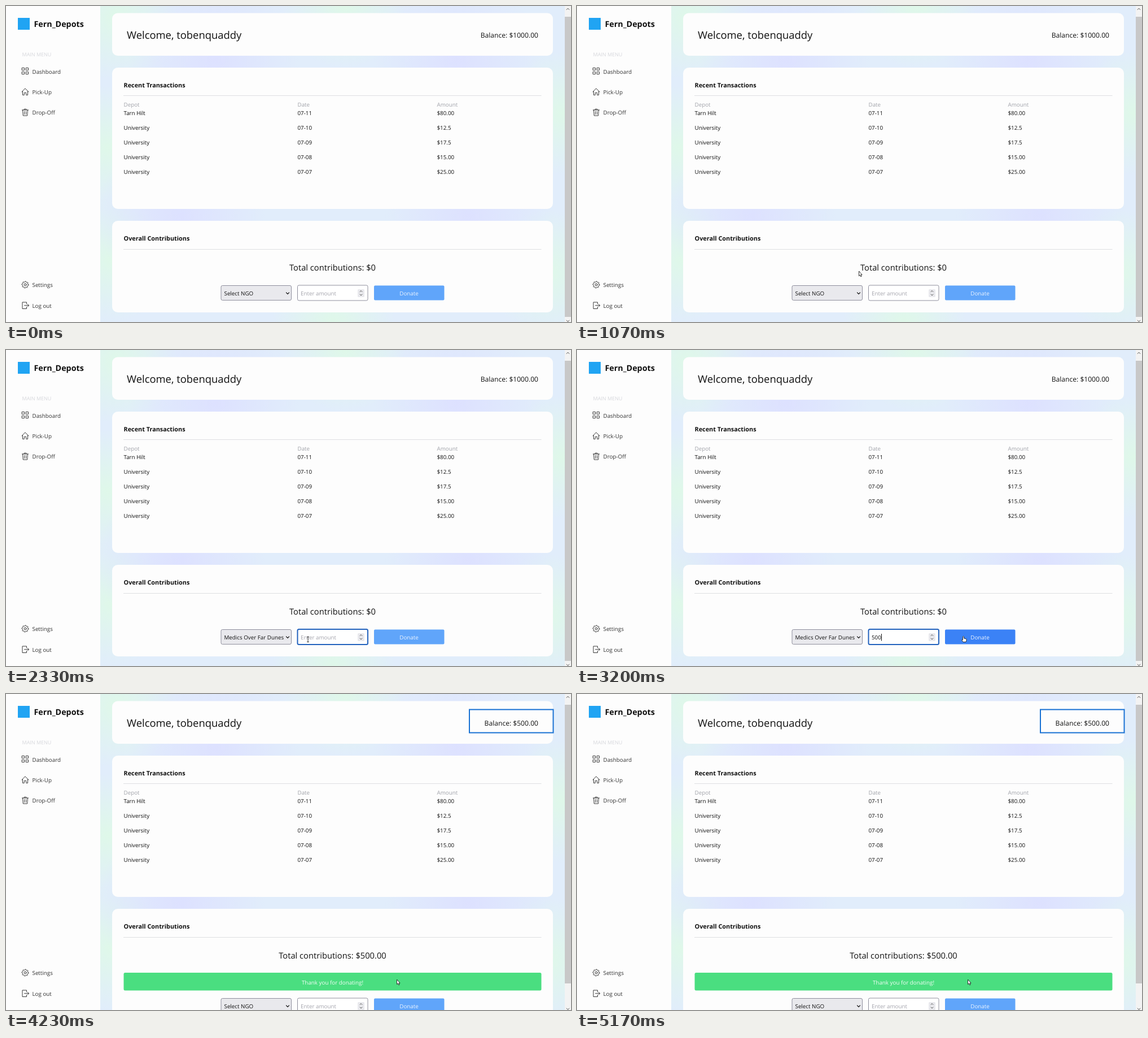
Recreate the animation shown at these times as an HTML page. Size 1001x559 px, loop 5.21 s.

```html
<!DOCTYPE html>
<html lang="en">
<head>
<meta charset="utf-8">
<title>Donation dashboard</title>
<style>
html, body { margin: 0; width: 100%; height: 100%; overflow: hidden; background: #fdfdfd; }
svg { display: block; width: 1001px; height: 559px; }
text { font: 9.8px "Open Sans", "Noto Sans", sans-serif; fill: #111; white-space: pre; text-rendering: geometricPrecision; }
.bold { font-weight: 700; font-size: 10.85px; }
.brand { font-weight: 700; font-size: 14.3px; }
.menu { fill: #333; }
.muted { fill: #a1a3aa; }
.mid { text-anchor: middle; }
.icon { fill: none; stroke: #3a3a3a; stroke-linecap: round; stroke-linejoin: round; }
.card { fill: #fdfdfd; }
.rule { stroke: #dedfe2; }
.field { stroke: #8f8f9d; }
</style>
</head>
<body>
<svg viewBox="0 0 1001 559">
  <defs>
    <radialGradient id="mint"><stop stop-color="#dff8e9"/><stop offset="1" stop-color="#dff8e9" stop-opacity="0"/></radialGradient>
    <radialGradient id="lilac"><stop stop-color="#dde1ff"/><stop offset="1" stop-color="#dde1ff" stop-opacity="0"/></radialGradient>
    <clipPath id="main"><path d="M167 0H990V559H167z"/></clipPath>
  </defs>

  <g clip-path="url(#main)">
    <path fill="#e1edfb" d="M167 0H990V559H167z"/>
    <g id="glow"></g>
    <rect class="card" x="188" y="12.5" width="781" height="75.5" rx="10"/>
    <rect class="card" x="188" y="109" width="781" height="250" rx="10"/>
    <rect class="card" id="giving" x="188" y="380" width="781" height="162" rx="10"/>
  </g>
  <path class="rule" d="M208 158.5H948.5M208 430.5H948.5"/>

  <rect x="21" y="21" width="21" height="21" fill="#20a4f3"/>
  <text class="brand" x="49.5" y="37">Fern_Depots</text>
  <text x="28.5" y="88.5" style="font-size:9px;fill:#d6d7dc">MAIN MENU</text>
  <g id="menu"></g>
  <g class="icon">
    <path d="M28.5 109.5h4v4h-4zM35.5 109.5h4v4h-4zM28.5 116.5h4v4h-4zM35.5 116.5h4v4h-4z"/>
    <path d="M27.8 152L34 145.8 40.2 152M29.5 150.5V157.5H32.3V153.5H35.7V157.5H38.5V150.5"/>
    <path d="M28.5 184H39.5M32 184V182.3H36V184M29.5 184L30.3 194H37.7L38.5 184M32.5 186.5V191.5M35.5 186.5V191.5"/>
    <path id="gear"/>
    <circle cx="34" cy="493" r="2"/>
    <path d="M36.5 527V524H29V535.5H36.5V532.5M32.5 529.7H40.5M38.3 527.5L40.5 529.7 38.3 532"/>
  </g>

  <text x="214" y="58" style="font-size:18.4px">Welcome, tobenquaddy</text>
  <text id="balance" x="943" y="56" text-anchor="end" style="font-size:12.1px"></text>
  <rect id="highlight" x="821" y="27.5" width="148.5" height="41" fill="none" stroke="#1871d3" stroke-width="2"/>

  <text class="bold" x="208.5" y="144">Recent Transactions</text>
  <g id="table"></g>

  <text class="bold" x="208.5" y="415">Overall Contributions</text>
  <text class="mid" id="total" x="578.5" y="468" style="font-size:14.7px"></text>
  <g id="thanks">
    <rect x="208.5" y="493" width="740" height="31.5" rx="2.5" fill="#4ade80"/>
    <text class="mid" x="578.5" y="513.5" style="fill:#f0fdf4">Thank you for donating!</text>
  </g>

  <g id="form">
    <rect class="field" x="381" y="494.5" width="124.5" height="26" rx="2.5" fill="#e9e9ed"/>
    <text id="charity" x="386.5" y="512"></text>
    <path class="icon" d="M496.5 507L499 509.5 501.5 507" style="stroke:#222;stroke-width:1.2"/>
    <rect id="amountBox" class="field" x="516.5" y="494" width="124.5" height="27" rx="2.5" fill="#fff"/>
    <text id="amount" x="522" y="512"></text>
    <path id="caret" d="M539.5 502V514.5" stroke="#111"/>
    <rect x="623" y="501" width="12" height="14" rx="1.5" fill="#e9e9ed"/>
    <path class="icon" d="M627 505.5L629 503.5 631 505.5M627 510L629 512 631 510" style="stroke:#555"/>
    <rect id="button" x="652" y="494.5" width="124.5" height="26" rx="2"/>
    <text class="mid" x="714" y="512" style="fill:#eaf3ff">Donate</text>
  </g>

  <path fill="#f3f3f3" d="M990 0H1001V559H990z"/>
  <rect id="thumb" x="990" y="19" width="11" fill="#c8c8c8"/>
  <path class="icon" d="M993.2 6.5L995.5 4 997.8 6.5M993.2 556L995.5 558.5 997.8 556" style="stroke:#555"/>

  <g id="pointer" stroke="#222" stroke-width=".9" stroke-linejoin="round" fill="#fff">
    <path id="arrow" d="M0 0V8.6L1.9 6.9 3.2 9.8 4.6 9.2 3.4 6.4H5.6z"/>
    <path id="beam" fill="none" d="M-1.8 .5H1.8M0 .5V9.5M-1.8 9.5H1.8"/>
    <path id="hand" d="M-1 6V1Q0 -.4 1 1V4L5 5Q5.8 5.4 5.5 7.5L4.5 10.5H-.5L-3 7Q-2.6 5.4 -1 7z"/>
  </g>
</svg>
<script>
const LOOP = 5210;
const PICKED = 1500, FOCUSED = 2200, DONATED = 3500, MARKED = 3650;
const TYPED = [2500, 2620, 2740];
// Pointer stops: time, x, y
const STOPS = [
  [800, 560, 562], [1060, 499.5, 469], [1120, 499.5, 469], [1280, 452, 506],
  [1540, 452, 506], [1780, 535, 507], [2780, 535, 507], [3080, 684.5, 506],
  [3560, 684.5, 506], [3800, 692.5, 505]
];

const $ = id => document.getElementById(id);
const show = (id, on) => $(id).setAttribute('visibility', on ? 'visible' : 'hidden');
const label = (x, y, text, kind = '') => `<text class="${kind}" x="${x}" y="${y}">${text}</text>`;
const glow = (kind, x, y, r) => `<circle cx="${x}" cy="${y}" r="${r}" fill="url(#${kind})"/>`;

$('glow').innerHTML =
  [[195, 20], [180, 250], [185, 450], [600, 0], [985, 190], [960, 470], [580, 560]].map(([x, y]) => glow('mint', x, y, 110)).join('') +
  [[370, 95], [800, 95], [310, 370], [820, 370]].map(([x, y]) => glow('lilac', x, y, 150)).join('');

$('menu').innerHTML = [['Dashboard', 119.5], ['Pick-Up', 156], ['Drop-Off', 192], ['Settings', 497], ['Log out', 534]]
  .map(([name, y]) => label(46.5, y, name, 'menu')).join('');

const columns = [208.5, 516.5, 763.5];
const row = (cells, y, kind) => cells.map((cell, i) => label(columns[i], y, cell, kind)).join('');
$('table').innerHTML = row(['Depot', 'Date', 'Amount'], 177.5, 'muted') +
  ['80.00', '12.5', '17.5', '15.00', '25.00'].map((sum, i) =>
    row([i ? 'University' : 'Tarn Hilt', '07-' + String(11 - i).padStart(2, '0'), '$' + sum], 193 + 26.1 * i)).join('');

$('gear').setAttribute('d', 'M' + Array.from({ length: 32 }, (_, i) => {
  const a = i * Math.PI / 16, r = i % 4 < 2 ? 6 : 4.7;
  return `${(34 + r * Math.cos(a)).toFixed(2)} ${(493 + r * Math.sin(a)).toFixed(2)}`;
}).join('L') + 'z');

function pointerAt(t) {
  const next = STOPS.findIndex(stop => stop[0] > t);
  if (next < 1) return STOPS[next ? STOPS.length - 1 : 0].slice(1);
  const [t0, x0, y0] = STOPS[next - 1], [t1, x1, y1] = STOPS[next];
  const p = (t - t0) / (t1 - t0), ease = p * p * (3 - 2 * p);
  return [x0 + (x1 - x0) * ease, y0 + (y1 - y0) * ease];
}

function render(t) {
  const done = t >= DONATED, focused = t >= FOCUSED && !done;
  const typed = done ? '' : '500'.slice(0, TYPED.filter(time => t >= time).length);
  const [x, y] = pointerAt(t);
  const inForm = !done && y > 494 && y < 521;
  const overInput = inForm && x > 516 && x < 641;
  const overButton = inForm && x > 652 && x < 777;

  $('balance').textContent = done ? 'Balance: $500.00' : 'Balance: $1000.00';
  $('total').textContent = 'Total contributions: ' + (done ? '$500.00' : '$0');
  $('charity').textContent = t >= PICKED && !done ? 'Medics Over Far Dunes' : 'Select NGO';
  $('amount').textContent = typed || 'Enter amount';
  $('amount').style.fill = typed ? '#111' : '#a5a5ad';
  $('amountBox').style.stroke = focused ? '#2463bd' : '#8f8f9d';
  $('amountBox').style.strokeWidth = focused ? 2 : 1;
  $('button').style.fill = overButton ? '#3b82f6' : '#60a5fa';
  $('form').setAttribute('transform', `translate(0 ${done ? 44 : 0})`);
  $('giving').setAttribute('height', done ? 206 : 162);
  $('thumb').setAttribute('height', done ? 493 : 531);
  $('caret').setAttribute('transform', `translate(${(typed.length - 3) * 5.6} 0)`);
  show('caret', typed);
  show('thanks', done);
  show('highlight', t >= MARKED);

  $('pointer').setAttribute('transform', `translate(${x} ${y})`);
  const shown = t >= STOPS[0][0];
  show('arrow', shown && !overInput && !overButton);
  show('beam', shown && overInput);
  show('hand', shown && overButton);
}

function tick() {
  render(performance.now() % LOOP);
  requestAnimationFrame(tick);
}
tick();
</script>
</body>
</html>
```
